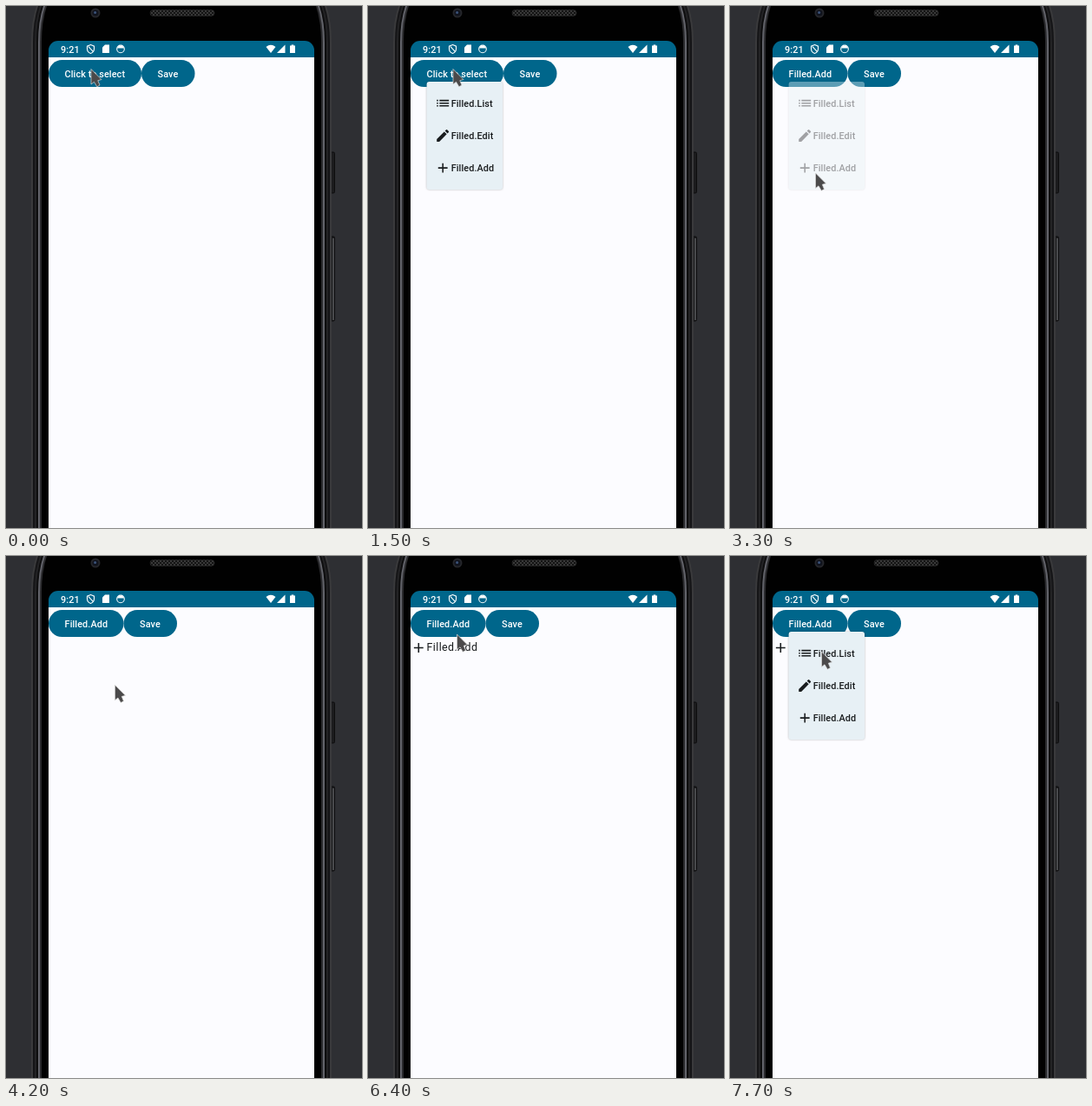
These frames come from a looping animation (410 by 600 pixels, 8000 ms). An HTML page:

```html
<!DOCTYPE html>
<html lang="en">
<head>
<meta charset="utf-8">
<style>
  html, body { margin: 0; width: 100%; height: 100%; overflow: hidden; background: #2e2f33; }
  svg { display: block; width: 410px; height: 600px; }
  text { font: 500 10.85px Roboto, sans-serif; letter-spacing: .078px; }
  .label { fill: #fff; }
  #menu { filter: drop-shadow(0 .6px .8px #0004); }
  #menu, #saved { fill: #191c1e; }
  #saved text { font-weight: 400; font-size: 12.4px; letter-spacing: .39px; }
</style>
</head>
<body>
<svg viewBox="0 0 410 600">
  <defs>
    <path id="list" d="M3 13h2v-2H3zm0 4h2v-2H3zm0-8h2V7H3zm4 4h14v-2H7zm0 4h14v-2H7zM7 7v2h14V7z"/>
    <path id="edit" d="M3 17.25V21h3.75L17.81 9.94l-3.75-3.75zM20.71 7.04a1 1 0 0 0 0-1.41l-2.34-2.34a1 1 0 0 0-1.41 0l-1.83 1.83 3.75 3.75z"/>
    <path id="add" d="M19 13h-6v6h-2v-6H5v-2h6V5h2v6h6z"/>
    <pattern id="mesh" width="4" height="4" patternUnits="userSpaceOnUse">
      <rect width="4" height="4" fill="#141414"/>
      <path d="M0 0l4 4M4 0l-4 4" stroke="#3c3c3c" stroke-width=".9"/>
    </pattern>
    <radialGradient id="glow">
      <stop offset=".55" stop-color="#fff"/>
      <stop offset="1" stop-color="#fff" stop-opacity=".3"/>
    </radialGradient>
    <clipPath id="clip"><rect id="clipRect" y="62.1" height="31" rx="15.5"/></clipPath>
  </defs>

  <rect width="410" height="600" fill="#2e2f33"/>
  <g fill="#1b1b1d" stroke="#0d0d0e">
    <rect x="373.5" y="168" width="5" height="47" rx="1.5"/>
    <rect x="373.5" y="265" width="5" height="97" rx="1.5"/>
  </g>
  <path d="M377 267v94" stroke="#77787c"/>
  <g id="shell"></g>

  <circle cx="103" cy="8" r="5.5" fill="#25262a"/>
  <circle cx="103" cy="8" r="3.5" fill="#10131d"/>
  <circle cx="102.6" cy="7.6" r="1.5" fill="#3c5379"/>
  <rect x="166" y="4.5" width="74" height="7" rx="3.5" fill="url(#mesh)" stroke="#2b2b2b" stroke-width=".6"/>

  <path d="M49 59h306v541H49z" fill="#fcfcff"/>
  <path d="M49 59V51a11 11 0 0 1 11-11H344a11 11 0 0 1 11 11V59z" fill="#00668b"/>
  <g fill="#fff">
    <text x="63" y="53.6">9:21</text>
    <path d="M97.5 44.6l4 1.6v3c0 2.5-1.7 4.4-4 5.2-2.3-.8-4-2.7-4-5.2v-3zM95 46.7l5 5.5" fill="none" stroke="#fff" stroke-width="1.1"/>
    <path d="M114 44.6h5v9.4h-8v-6.4z"/>
    <circle cx="132" cy="49.4" r="4.3" fill="none" stroke="#fff" stroke-width="1.1"/>
    <path d="M128 48.4a4.2 4.2 0 0 1 8 0z"/>
    <path d="M299.5 47q5.5-4.6 11 0l-5.5 7z"/>
    <path d="M321.5 44.5v9.5h-9.5z"/>
    <path d="M328.7 44.4h2.6v1h1.7v8.6h-6v-8.6h1.7z"/>
  </g>

  <rect id="pick" x="49" y="62.1" height="31" rx="15.5" fill="#00668b"/>
  <rect id="save" width="61.5" y="62.1" height="31" rx="15.5" fill="#00668b"/>
  <g clip-path="url(#clip)"><circle id="ripple" fill="url(#glow)"/></g>
  <text id="pickText" class="label" x="67.6" y="81.5"></text>
  <text id="saveText" class="label" y="81.5">Save</text>

  <g id="saved">
    <use href="#add" transform="translate(49 96.2) scale(.775)"/>
    <text x="67.6" y="109.4">Filled.Add</text>
  </g>
  <g id="menu"><rect x="67.6" y="87" width="87.4" height="124" rx="3" fill="#e7f0f5"/></g>
  <path id="cursor" d="M0 0V17.5L3.5 14.8 6.8 20.3 10 18.5 7.8 13.2 12 12z" fill="#4b4a4b" stroke="#ddd" stroke-width=".7" stroke-linejoin="round"/>
</svg>
<script>
const $ = id => document.getElementById(id);
const set = (id, attrs) => { for (const k in attrs) $(id).setAttribute(k, attrs[k]); };
const clamp = v => Math.max(0, Math.min(1, v));

// Phone shell: nested outlines from the rim inwards
$('shell').innerHTML = ['#3a3a3c', '#151517', '#232325', '#0d0d0e', '#62636a', '#2b2b2e', '#010101']
  .map((fill, i) => {
    const l = 29 + i * 2, r = 404 - l;
    return `<path fill="${fill}" d="M${l + 6} 0Q${l} 18 ${l} 42V600H${r}V42Q${r} 18 ${r - 6} 0z"/>`;
  }).join('');

['List', 'Edit', 'Add'].forEach((name, i) => {
  const y = 102.4 + i * 37.2;
  $('menu').insertAdjacentHTML('beforeend',
    `<use href="#${name.toLowerCase()}" transform="translate(76.9 ${y}) scale(.775)"/>
     <text x="95.7" y="${y + 13.4}">Filled.${name}</text>`);
});

const moves = [
  { from: 1700, to: 1900, x: 101, y: 115 },
  { from: 2000, to: 2600, x: 103, y: 198 },
  { from: 2700, to: 2800, x: 98.5, y: 192 },
  { from: 4100, to: 4600, x: 163.5, y: 86.5 },
  { from: 5900, to: 6100, x: 118, y: 90 },
  { from: 6200, to: 6400, x: 102.5, y: 90 },
  { from: 7300, to: 7600, x: 105.5, y: 110 }
];

// Each move eases out from wherever the previous one ended
function pointer(t) {
  let x = 98, y = 72.5;
  for (const m of moves) {
    const p = 1 - (1 - clamp((t - m.from) / (m.to - m.from))) ** 2.4;
    x += (m.x - x) * p;
    y += (m.y - y) * p;
  }
  return [x, y];
}

const presses = [
  { at: 700, button: 'pick' },
  { at: 5000, button: 'save' },
  { at: 6900, button: 'pick' }
];
const choose = 3300;

function draw(t) {
  const chosen = t >= choose;
  const width = chosen ? 86.5 : 107;
  set('pick', { width });
  set('save', { x: 49 + width });
  set('saveText', { x: 67.6 + width });
  $('pickText').textContent = chosen ? 'Filled.Add' : 'Click to select';
  set('saved', { opacity: t >= 5200 ? 1 : 0 });

  const { at, button } = presses.findLast(p => p.at <= t) || presses[0];
  const age = t - at;
  const [cx, cy] = pointer(at);
  const glow = age < 0 ? 0 : .17 * clamp((age + 150) / 250) * clamp(1 - age / 800);
  set('clipRect', { x: $(button).getAttribute('x'), width: $(button).getAttribute('width') });
  set('ripple', { cx, cy, r: 22 + clamp(age / 250) * 48, opacity: glow });

  const scale = .8 + .2 * clamp((age - 100) / 200);
  const closing = chosen && at < choose ? .4 * (t < choose + 100) : 1;
  const opacity = button === 'pick' ? clamp((age - 100) / 100) * closing : 0;
  set('menu', { opacity, transform: `translate(67.6 87) scale(${scale}) translate(-67.6 -87)` });
  set('cursor', { transform: `translate(${pointer(t)})` });
}

// The screen advances in steps of 100 ms
function tick() {
  draw(Math.floor(performance.now() % 8000 / 100) * 100);
  requestAnimationFrame(tick);
}
tick();
</script>
</body>
</html>
```
